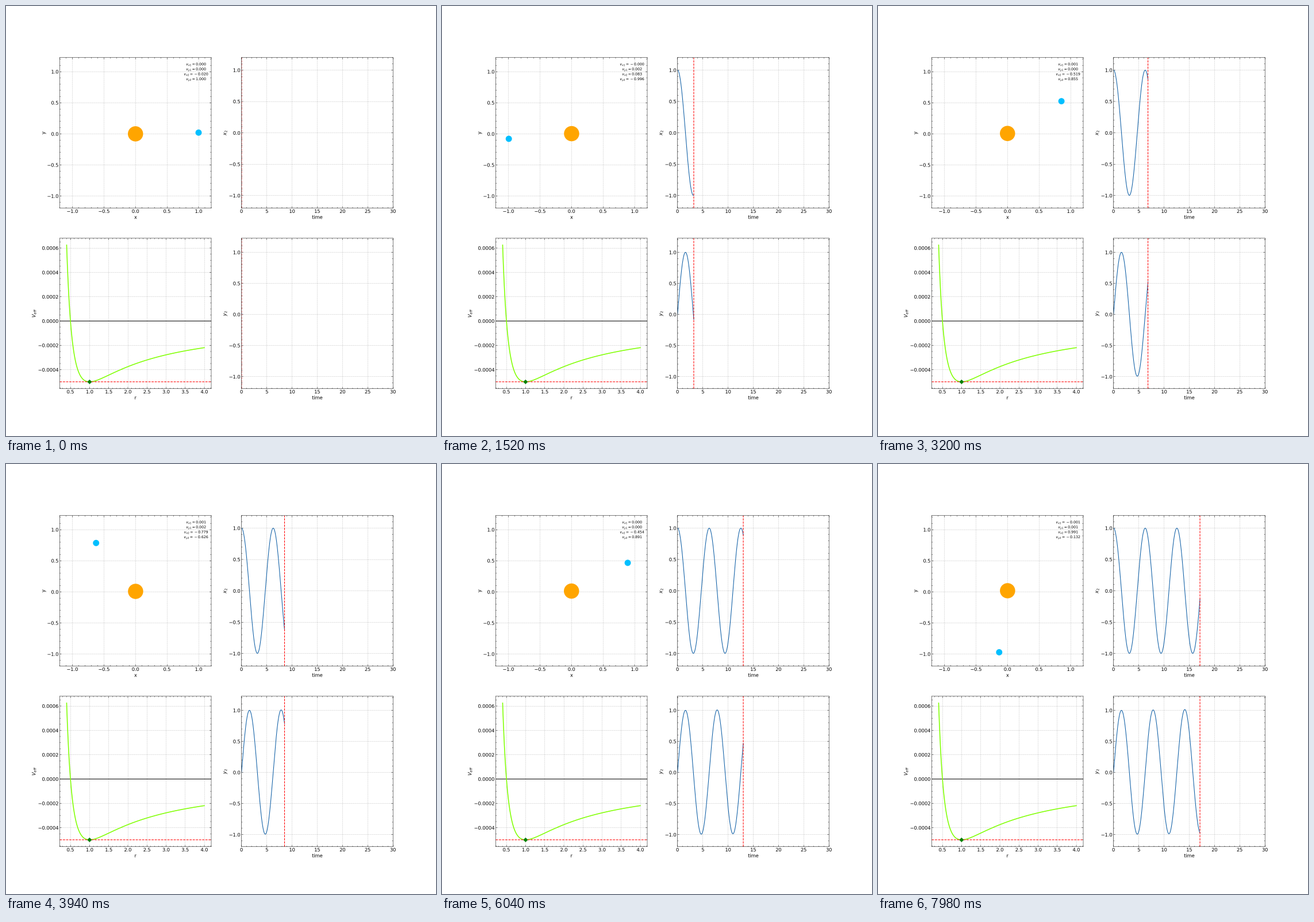
Write a matplotlib script that moves like this. It is 748x748 px and loops after 8000 ms.

```python
from functools import lru_cache

import numpy as np
import matplotlib.pyplot as plt
from matplotlib.animation import FuncAnimation
from matplotlib.patches import Circle, PathPatch, RegularPolygon
from matplotlib.textpath import TextPath
from matplotlib.transforms import Affine2D

plt.rcParams.update({
    "font.family": "DejaVu Sans", "font.size": 16, "mathtext.fontset": "dejavusans",
    "axes.labelsize": 16, "axes.linewidth": 1, "axes.axisbelow": True,
    "axes.grid": True, "grid.color": "k", "grid.alpha": 0.5,
    "grid.linestyle": "--", "grid.linewidth": 0.5, "lines.linewidth": 2,
    "xtick.top": True, "ytick.right": True,
})
for tick in ("xtick", "ytick"):
    plt.rcParams.update({
        f"{tick}.direction": "in", f"{tick}.labelsize": 16,
        f"{tick}.minor.visible": True,
        f"{tick}.major.size": 6, f"{tick}.minor.size": 3,
        f"{tick}.major.width": 1, f"{tick}.minor.width": 1,
    })

SIZE, DPI = 748, 37.4
PT = DPI / 72         # pixels per point
MASS = 0.001          # planet mass, the star has mass 1
DT, SUBSTEPS = 0.02, 5
POSES = 172
TICK_MS, LOOP_MS = 20, 8000


def slope(state):
    p, v = state
    d = p[1] - p[0]
    pull = d / np.linalg.norm(d) ** 3
    return np.array([v, [MASS * pull, -pull]])


def simulate(steps):
    """Integrate both bodies with Heun's method."""
    state = np.array([[[0.0, 0.0], [1.0, 0.0]], [[0.0, 0.0], [0.0, 1.0]]])
    states = [state]
    for _ in range(steps):
        k1 = slope(state)
        k2 = slope(state + k1 * DT)
        state = state + (k1 + k2) * DT / 2
        states.append(state)
    return np.array(states).swapaxes(0, 1)


def potential(r):
    return MASS * (0.5 / r ** 2 - 1 / r)


def pose_at(ms):
    """Poses come in threes, held for 20, 100 and 20 ms."""
    k, rest = divmod(ms, 140)
    return 3 * k + (rest >= 20) + (rest >= 120)


def setup(ax, xlabel, ylabel, xlim, ylim):
    ax.set(xlabel=xlabel, ylabel=ylabel, xlim=xlim, ylim=ylim)


def smooth_render(k=4):
    """Draw the figure k times larger and average it down."""
    fig.set_dpi(DPI * k)
    fig.canvas.draw()
    big = np.asarray(fig.canvas.buffer_rgba()).reshape(SIZE, k, SIZE, k, 4)
    fig.set_dpi(DPI)
    return big.mean(axis=(1, 3)).round().astype(np.uint8)


def add_shape(ax, shape, color):
    shape.set(facecolor=color, linewidth=0, zorder=2.2)
    return ax.add_patch(shape)


def move(shape, ax, x, y):
    shape.set_transform(Affine2D().translate(*ax.transData.transform((x, y))))


@lru_cache(maxsize=None)
def label_path(label):
    path = TextPath((0, 0), label, size=12)
    box = path.get_extents()
    return Affine2D().translate(-(box.x0 + box.x1) / 2, 0).transform_path(path)


pos, vel = simulate(POSES * SUBSTEPS)
time = np.arange(len(pos)) * DT
radius = np.linalg.norm(pos[:, 1] - pos[:, 0], axis=1)

fig, axes = plt.subplots(2, 2, figsize=(20, 20), dpi=DPI)
(orbit, xplot), (well, yplot) = axes
XLIM, YLIM = (-1.2, 1.2), (-1.195, 1.227)
setup(orbit, "x", "y", XLIM, YLIM)
setup(xplot, "time", "$x_2$", (0, 30), XLIM)
setup(yplot, "time", "$y_2$", (0, 30), YLIM)
setup(well, "r", "$V_{eff}$", (0.22, 4.18), (-0.00055625, 0.00068125))

r = np.linspace(0.4, 4, 400)
fixed = [well.axhline(0, color="k"),
         well.plot(r, potential(r), color="chartreuse", lw=3, scalex=False, scaley=False)[0],
         well.axhline(-MASS / 2, color="r", ls="--")]

# Render everything that never changes once and keep it as a backdrop.
for ax in axes.flat:
    ax.spines[:].set_visible(False)
backdrop = smooth_render()
for line in fixed:
    line.set_visible(False)
for ax in axes.flat:
    ax.spines[:].set(visible=True, snap=False)
    ax.xaxis.set_visible(False)
    ax.yaxis.set_visible(False)
    ax.patch.set_visible(False)
    ax.set_autoscale_on(False)
fig.figimage(backdrop, zorder=-1)

star = add_shape(orbit, Circle((0, 0), 25.5 * PT), "orange")
planet = add_shape(orbit, Circle((0, 0), 10.5 * PT), "deepskyblue")
marker = add_shape(well, RegularPolygon((0, 0), 4, radius=11 / 2 ** 0.5 * PT), "green")

# Four centred rows of velocities, placed by their baselines.
center = orbit.transAxes.transform((0.9, 0.9))[0]
readout = []
for row in range(4):
    text = add_shape(orbit, PathPatch(label_path("0")), "k")
    text.set_transform(Affine2D().scale(PT).translate(center, SIZE - 103.3 - 8.6 * row))
    readout.append(text)

curves = [ax.plot([], [], color="#0C5DA5")[0] for ax in (xplot, yplot)]
cursors = [ax.axvline(0, color="r", ls="--", snap=False) for ax in (xplot, yplot)]


def update(frame):
    n = 1 + SUBSTEPS * pose_at(frame * TICK_MS)
    move(star, orbit, *pos[n, 0])
    move(planet, orbit, *pos[n, 1])
    move(marker, well, radius[n], potential(radius[n]))
    for axis, (curve, cursor) in enumerate(zip(curves, cursors)):
        curve.set_data(time[:n + 1], pos[:n + 1, 1, axis])
        cursor.set_xdata([time[n], time[n]])
    for text, name, value in zip(readout, ("x1", "y1", "x2", "y2"), vel[n].flat):
        text.set_path(label_path(f"$v_{{{name}}} = {value:.3f}$"))
    return star, planet, marker, *readout, *curves, *cursors


anim = FuncAnimation(fig, update, frames=LOOP_MS // TICK_MS, interval=TICK_MS,
                     repeat=True, repeat_delay=0, blit=False)
plt.show()
```
